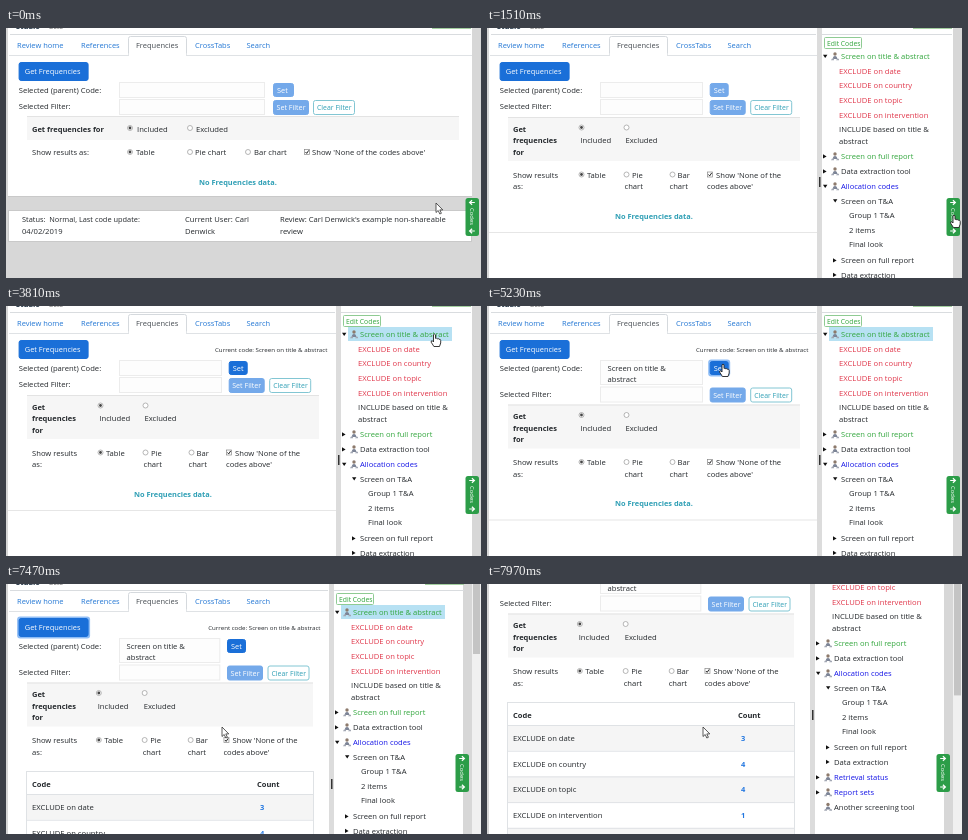
Animation, 475 px wide and 250 px high, one loop 8000 ms. Source, as an HTML page:

```html
<!DOCTYPE html>
<html lang="en">
<head>
<meta charset="utf-8">
<title>Frequencies</title>
<style>
html, body { margin: 0; width: 100%; height: 100%; overflow: hidden; background: #d7d7d7; }
svg { display: block; width: 475px; height: 250px; font-family: "Open Sans", "Noto Sans", sans-serif; }
text { white-space: pre; }
</style>
</head>
<body>
<svg viewBox="0 0 475 250">
  <g id="page"></g>
  <g id="fixed"></g>
  <g id="cursor">
    <path id="arrow" d="M0 0V9.5L2.2 7.5L3.8 11L5.4 10.3L3.8 6.9H6.8Z" fill="#fff" stroke="#333" stroke-width=".8"/>
    <path id="hand" d="M-1 .8Q0-.6 1 .8V4.4Q2 3.7 2.8 4.8Q4 4.2 4.6 5.3Q6 4.9 6.2 6.4V9L5 12.5H-.6L-3.3 8.2Q-3.6 6.5-2.2 6.7L-1 8Z" fill="#fff" stroke="#222" stroke-width=".9"/>
  </g>
</svg>
<script>
const LOOP = 8000;
const BLUE = '#1a6fd8', PALE = '#74a9ea', TEAL = '#2f9fb5', INK = '#24282c';
const GREEN = '#2fa53a', RED = '#e0364a', LINK = '#1414e6';
const byId = id => document.getElementById(id);

const text = (x, y, str, fill = INK, size = 7.65, weight = 400) =>
  `<text x="${x}" y="${y}" fill="${fill}" font-size="${size}" font-weight="${weight}">${str.replace(/&/g, '&amp;')}</text>`;
const bold = (x, y, str, fill = INK, size = 7.5) => text(x, y, str, fill, size, 700);
const rect = (x, y, w, h, fill, extra = '') =>
  `<rect x="${x}" y="${y}" width="${w}" height="${h}" fill="${fill}" ${extra}/>`;
const frame = (x, y, w, h, fill, stroke, r = 0) =>
  rect(x + .5, y + .5, w - 1, h - 1, fill, `stroke="${stroke}" rx="${r}"`);
const rule = (x, y, w, fill = '#dfe2e5') => rect(x, y, w, 1, fill);
const input = (x, y, w, h) => frame(x, y, w, h, '#fdfdfd', '#ececec');

function button(x, y, w, h, label, fill, { focus, color = '#fff', stroke = fill, pad = 4, size = 7.4 } = {}) {
  const ring = focus ? rect(x - 1.5, y - 1.5, w + 3, h + 3, '#8fbdf5', 'rx="3"') : '';
  return ring + frame(x, y, w, h, fill, stroke, 2) + text(x + pad, y + h / 2 + 2.8, label, color, size);
}
const filterButtons = (setX, clearX, y) =>
  button(setX, y, 36, 15, 'Set Filter', PALE, { pad: 3.5, size: 7.15 }) +
  button(clearX, y, 42, 15, 'Clear Filter', '#fff', { color: TEAL, stroke: '#82c6d3', size: 6.9 });

const radio = (x, y, on) =>
  `<circle cx="${x}" cy="${y}" r="2.5" fill="#fff" stroke="#999" stroke-width=".7"/>` +
  (on ? `<circle cx="${x}" cy="${y}" r="1.4" fill="#444"/>` : '');
const checkbox = (x, y) =>
  rect(x - 2.5, y - 2.5, 5, 5, '#fff', 'stroke="#888" stroke-width=".7"') +
  `<path d="M${x - 1.5} ${y}l1.2 1.4l2-3" fill="none" stroke="#222"/>`;

function header(right) {
  const tabs = [[11, 'Review home'], [75, 'References'], [189, 'CrossTabs'], [240.5, 'Search']];
  return bold(10, 1, 'Studio', '#234', 7.5) + text(43, 1, 'Beta', '#666', 6.5) +
    rule(4, 6, right - 5, '#d9dcdf') + rule(3, 27, right - 3) +
    frame(122, 8, 59, 20, '#fff', '#d5d9dd', 2) + rect(123, 26, 57, 2, '#fff') +
    tabs.map(([x, label]) => text(x, 20, label, '#2377d4', 7.5)).join('') +
    text(130, 20, 'Frequencies', '#454b51', 7.5);
}

function closedPage() {
  return rect(2, 0, 464, 169, '#fff') + rule(2, 168, 464, '#c9c9c9') +
    rect(426, 0, 39, 1, '#a4cfa0') + header(466) +
    button(12.6, 34, 70, 19, 'Get Frequencies', BLUE, { pad: 6.2 }) +
    text(12.7, 64.5, 'Selected (parent) Code:') + text(12.7, 81, 'Selected Filter:') +
    input(113, 54, 146, 16) + input(113, 71, 146, 16) +
    button(267, 55, 21, 14, 'Set', PALE) + filterButtons(267, 307, 72) +
    rect(21, 88, 432, 24, '#f6f6f6') + rule(21, 88, 432, '#e3e3e3') +
    bold(26, 103.5, 'Get frequencies for') +
    radio(124, 100, true) + text(131, 103.5, 'Included') + radio(184, 100) + text(190, 103.5, 'Excluded') +
    text(26, 127, 'Show results as:') +
    radio(124, 124, true) + text(130, 127, 'Table') + radio(184, 124) + text(189, 127, 'Pie chart') +
    radio(242, 124) + text(248, 127, 'Bar chart') + checkbox(301, 124) +
    text(306, 127, "Show 'None of the codes above'") +
    bold(193, 156.5, 'No Frequencies data.', TEAL, 7.4) +
    frame(2, 182, 464, 32, '#fff', '#c9c9c9') +
    text(16, 194, 'Status:  Normal, Last code update:', INK, 7.4) + text(16, 206, '04/02/2019') +
    text(179, 194, 'Current User: Carl') + text(179, 206, 'Denwick') +
    text(274, 194, "Review: Carl Denwick's example non-shareable") + text(274, 206, 'review');
}

const person = (x, y) =>
  `<g transform="translate(${x} ${y})" fill="#7c8496"><circle cx="4" cy="-5" r="1.7" fill="#8d7a6c"/>` +
  '<path d="M1.8 0Q1.8-3 4-3T6.2 0Z"/><path d="M0 1.3h3v-1.8h-2zM5 1.3h3v-1.3l-1.5-.8z" fill="#a3a8b4"/></g>';
const triangle = (x, y, open) =>
  `<path d="M${x} ${y}${open ? 'h4.4l-2.2 3.4z' : 'v4.4l3.6-2.2z'}" fill="#111"/>`;

function tree(s) {
  const x = s.table ? 328 : 335;
  const root = (y, label, color, state) =>
    (state ? triangle(x + 1, y - (state === 'open' ? 4.3 : 4.8), state === 'open') : '') +
    person(x + 9, y) + text(x + 19, y, label, color, 7.6);
  const child = (y, label, open) => triangle(x + 11, y - (open ? 4.3 : 4.8), open) + text(x + 19, y, label);
  const highlight = s.selected ? '#b7e1f3' : s.hover ? '#edf6fb' : null;
  const excludes = ['date', 'country', 'topic', 'intervention'];
  return rect(x, 0, s.table ? 129 : 131, 330, '#fff') + rule(x, 6, 130, '#d9dcdf') +
    rect(x + 91, 0, 39, 1, '#a4cfa0') +
    frame(x + 2, 9, 38, 12, '#fff', '#8fcb93', 1) + text(x + 5, 17.5, 'Edit Codes', GREEN, 6.8) +
    (highlight ? rect(x + 7, 21, 104, 14, highlight) : '') +
    root(31, 'Screen on title & abstract', GREEN, 'open') +
    excludes.map((name, i) => text(x + 17, 45.7 + i * 14.6, 'EXCLUDE on ' + name, RED)).join('') +
    text(x + 17, 104, 'INCLUDE based on title &') + text(x + 17, 115.5, 'abstract') +
    root(131, 'Screen on full report', GREEN, 'closed') + root(146, 'Data extraction tool', INK, 'closed') +
    root(161, 'Allocation codes', LINK, 'open') + child(175.5, 'Screen on T&A', true) +
    ['Group 1 T&A', '2 items', 'Final look'].map((label, i) => text(x + 27, 190 + i * 14.7, label)).join('') +
    child(235, 'Screen on full report') + child(249.5, 'Data extraction') +
    root(265, 'Retrieval status', LINK, 'closed') + root(280, 'Report sets', LINK, 'closed') +
    root(294.5, 'Another screening tool', INK);
}

function resultsTable(right) {
  const rows = [['EXCLUDE on date', 3], ['EXCLUDE on country', 4], ['EXCLUDE on topic', 4], ['EXCLUDE on intervention', 1], ['', '']];
  const width = right - 20;
  return rule(20, 187, width) + bold(26, 202.5, 'Code') + bold(251, 202.5, 'Count') +
    rows.map(([label, count], i) => {
      const y = 210 + i * 25.7;
      return rect(20, y, width, 25.7, i % 2 ? '#fff' : '#f5f5f5') + rule(20, y, width) +
        text(26, y + 16, label) + bold(254, y + 16, String(count), '#2377e0');
    }).join('') +
    rect(20, 187, 1, 150, '#dfe2e5') + rect(right, 187, 1, 150, '#dfe2e5');
}

function openPage(s) {
  const shift = s.table ? 1.7 : 0;
  const right = s.table ? 323 : 330;
  const bandRight = s.table ? 307 : 313;
  const dy = s.code ? 9.5 : 0;
  const setX = 222.7 - shift, inputW = 103 - shift;
  const handleY = s.table ? 195 : 149;
  return rect(2, 0, right - 2, 330, '#fff') + header(right) +
    (s.table ? '' : rule(2, 204 + dy, right - 2, '#e6e6e6')) +
    rect(right, 0, 5, 330, '#dcdcdc') + rect(right + 2, handleY, 1.5, 10, '#333') +
    button(12.6, 34, 70, 19, 'Get Frequencies', BLUE, { pad: 6.2, focus: s.getFocus }) +
    (s.selected ? text(209 - shift * 4, 45.5, 'Current code: Screen on title & abstract', INK, 6.15) : '') +
    text(12.7, 64.5, 'Selected (parent) Code:') + text(12.7, 81 + dy, 'Selected Filter:') +
    input(113, 54, inputW, s.code ? 25 : 16) +
    (s.code ? text(120.5, 64.5, 'Screen on title &') + text(120.5, 75.5, 'abstract') : '') +
    button(setX, 55, 19, 14, 'Set', s.selected ? BLUE : PALE, { focus: s.setFocus }) +
    input(113, 71 + dy, inputW, 16) + filterButtons(setX, setX + 40.5, 72 + dy) +
    `<g transform="translate(0 ${dy})">` +
    rect(21, 89, bandRight - 21, 44, '#f6f6f6') + rule(21, 89, bandRight - 21, '#e3e3e3') +
    ['Get', 'frequencies', 'for'].map((word, i) => bold(26, 103.5 + i * 11.6, word)).join('') +
    radio(94.5 - shift, 99.5, true) + text(93.4 - shift, 115, 'Included') +
    radio(139.5 - shift / 2, 99.5) + text(138.5 - shift / 2, 115, 'Excluded') +
    text(26, 149.5, 'Show results') + text(26, 161, 'as:') +
    radio(94.5 - shift, 146.5, true) + text(100 - shift, 149.5, 'Table') +
    radio(139.5 - shift / 2, 146.5) + text(145 - shift / 2, 149.5, 'Pie') + text(137.5 - shift / 2, 161, 'chart') +
    radio(185.5 - shift / 2, 146.5) + text(190.5 - shift / 2, 149.5, 'Bar') + text(182.5 - shift / 2, 161, 'chart') +
    checkbox(223 - shift * 1.5, 146.5) + text(229 - shift * 1.5, 149.5, "Show 'None of the") +
    text(220 - shift * 1.5, 161, "codes above'") +
    (s.table ? '' : bold(128, 190.5, 'No Frequencies data.', TEAL, 7.4)) + '</g>' +
    (s.table ? resultsTable(bandRight) : '') + tree(s);
}

function codesTab(s) {
  const x = s.table ? 449.5 : 459.5, dir = s.open ? 1 : -1;
  const arrow = y => `<path d="M${x + 6.5 - dir * 2.8} ${y}h${dir * 5}m${-dir * 2.3}-2.3l${dir * 2.5} 2.3l${-dir * 2.5} 2.3" fill="none" stroke="#fff" stroke-width="1.2"/>`;
  return rect(x, 170, 13.5, 38, '#2c9d48', 'rx="2.5"') + arrow(174.5) + arrow(203) +
    `<g transform="translate(${x + 4.6} 180) rotate(90)">${text(0, 0, 'Codes', '#fff', 5.9)}</g>`;
}

const scrollbar = offset => rect(466, 0, 9, 250, '#f0f0f0') + rect(467, 0, 7, 70 + offset * .6, '#c4c4c4');

// [start, end, x, y, share of the move after which the hand shows]
const moves = [
  [460, 1000, 467, 187, .82],
  [2090, 2570, 428.5, 28, .8],
  [3810, 4470, 236, 58, .85],
  [5690, 6290, 51.5, 39, .7],
  [6860, 7340, 216, 143, 2],
];
const ease = p => p * p * (3 - 2 * p);
const progress = (t, a, b) => Math.min(1, Math.max(0, (t - a) / (b - a)));

function cursorAt(t) {
  let x = 430, y = 175, hand = false;
  for (const [start, end, toX, toY, handFrom] of moves) {
    if (t < start) break;
    const p = ease(progress(t, start, end));
    x += (toX - x) * p;
    y += (toY - y) * p;
    hand = p >= handFrom || (hand && p < .12);
  }
  return { x, y, hand };
}

const stateAt = t => ({
  open: t >= 1260,
  hover: t >= 2480,
  selected: t >= 3260,
  code: t >= 4990,
  setFocus: t >= 4930 && t < 6670,
  getFocus: t >= 6670,
  table: t >= 6740,
});

let drawn = '';
function draw(t) {
  const state = stateAt(t), key = JSON.stringify(state);
  if (key !== drawn) {
    byId('page').innerHTML = state.open ? openPage(state) : closedPage();
    drawn = key;
  }
  const scroll = 69 * ease(progress(t, 7600, 7950));
  byId('page').setAttribute('transform', `translate(0 ${-scroll})`);
  byId('fixed').innerHTML = (state.table ? scrollbar(scroll) : '') + codesTab(state);
  const { x, y, hand } = cursorAt(t);
  byId('cursor').setAttribute('transform', `translate(${x} ${y})`);
  byId('hand').style.display = hand ? '' : 'none';
  byId('arrow').style.display = hand ? 'none' : '';
}

const begin = performance.now();
function tick() {
  draw((performance.now() - begin) % LOOP);
  requestAnimationFrame(tick);
}
tick();
</script>
</body>
</html>
```
